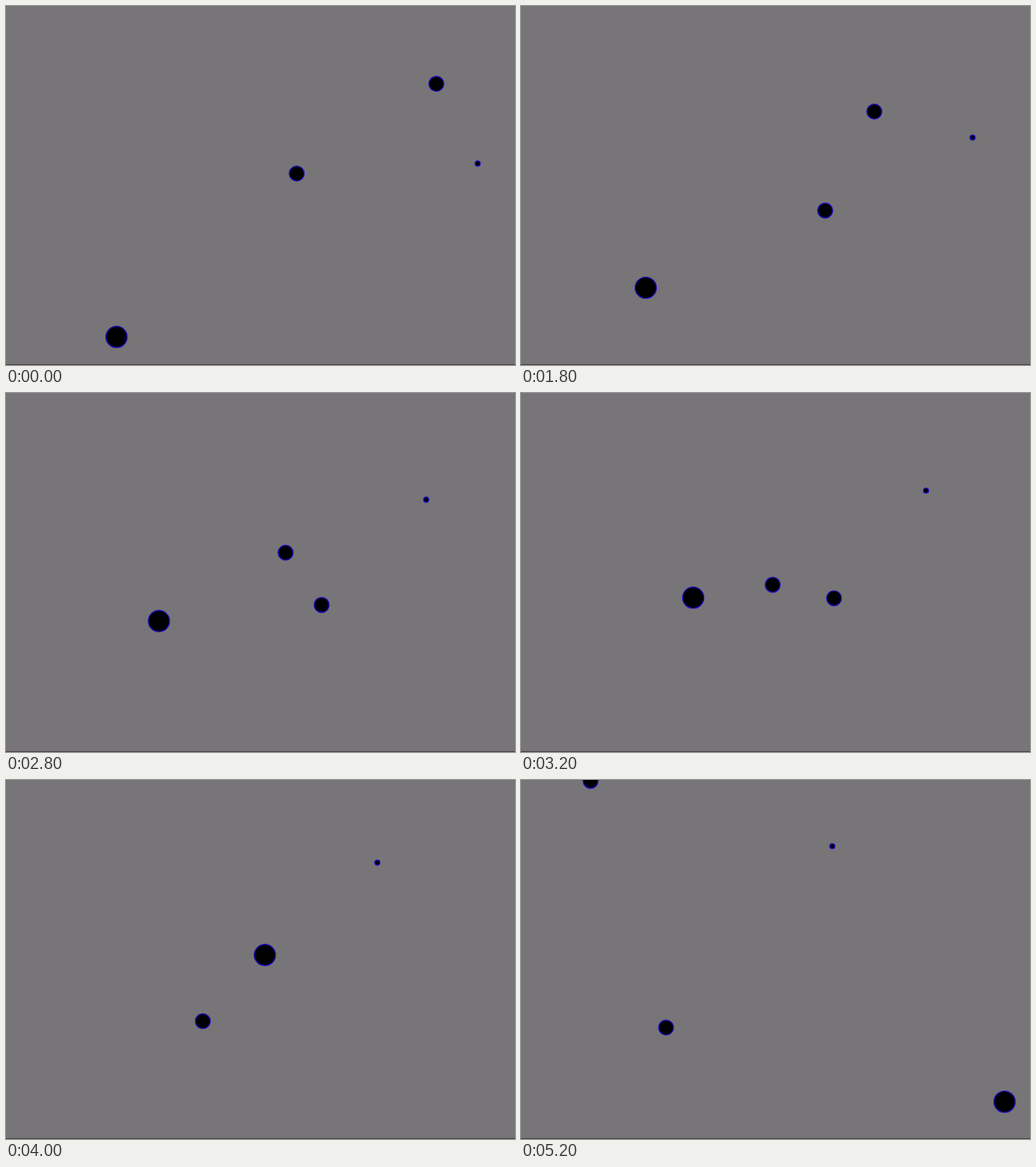
An HTML page for the animation above (5300 ms loop, 600 by 423 pixels).

```html
<!DOCTYPE html>
<html lang="en">
<head>
<meta charset="utf-8">
<title>Four bodies</title>
<style>
html, body { margin: 0; width: 100%; height: 100%; overflow: hidden; background: #777577; }
svg { display: block; width: 100%; height: 100%; }
circle { fill: #000; stroke: #1c08c4; stroke-width: 1.2; }
</style>
</head>
<body>
<svg id="stage" viewBox="0 0 600 423">
  <rect width="600" height="423" fill="#777577"/>
  <rect y="422" width="600" height="1" fill="#4a4347"/>
</svg>
<script>
const LOOP = 5300, STEP = 100, HOLD = 600;
const MEET = 34; // step at which the heavy body and its partner swing past each other

// Smooth curve through a few [step, x, y] points.
function curve(p) {
  const last = p.length - 1;
  const slope = (i, k) => (p[i + 1][k] - p[i][k]) / (p[i + 1][0] - p[i][0]);
  function velocity(i, k) {
    if (i === 0) return 2 * slope(0, k) - velocity(1, k);
    if (i === last) return 2 * slope(last - 1, k) - velocity(last - 1, k);
    const before = p[i][0] - p[i - 1][0], after = p[i + 1][0] - p[i][0];
    return (slope(i - 1, k) * after + slope(i, k) * before) / (before + after);
  }
  return s => {
    let i = 0;
    while (i < last - 1 && s >= p[i + 1][0]) i++;
    const h = p[i + 1][0] - p[i][0], u = (s - p[i][0]) / h, v = 1 - u;
    return [1, 2].map(k =>
      v * v * (1 + 2 * u) * p[i][k] + u * u * (3 - 2 * u) * p[i + 1][k]
      + h * u * v * (v * velocity(i, k) - u * velocity(i + 1, k)));
  };
}

const small = curve([[0, 556, 185.7], [12, 532.3, 155], [26, 477.4, 115], [46, 367, 78]]);
const free = curve([
  [0, 507.3, 91.7], [12, 416.5, 124.4], [18, 363.3, 156.2], [26, 296.7, 226],
  [30, 264, 267], [34, 232, 284.2], [36, 218.7, 288.2], [46, 171, 291.7]]);

// The pair: a drifting midpoint and the gap between the two bodies.
const middle = curve([
  [0, 236.5, 293.7], [12, 252.8, 286.5], [18, 266.5, 274.3], [26, 286, 241.5],
  [34, 305.2, 206.2], [42, 319.3, 196.2], [46, 326, 190.1]]);

// Free fall: distance is smooth in (time left) ^ 2/3.
const fallTime = s => (MEET - s) ** (2 / 3);
const fall = curve([
  [34, 0, 0], [32, 75, 19], [26, 166, 0.6], [18, 205, -43.8], [12, 211.5, -91],
  [0, 212.4, -192.5]].map(([s, x, y]) => [fallTime(s), x, y]));

function gap(s) {
  if (s <= MEET) return fall(fallTime(s));
  const r = 66 * (s - MEET) ** 0.9;
  return [-0.79 * r, -0.612 * r];
}

function pair(side) {
  return s => {
    const m = middle(s), d = gap(s);
    return [m[0] + side * d[0] / 2, m[1] + side * d[1] / 2];
  };
}

const stage = document.getElementById('stage');
function body(r, at) {
  const node = document.createElementNS(stage.namespaceURI, 'circle');
  node.setAttribute('r', r);
  stage.append(node);
  return { node, at };
}
const bodies = [body(3, small), body(8.8, free), body(8.8, pair(1)), body(12.5, pair(-1))];

function draw(time) {
  const s = Math.max(0, Math.floor((time % LOOP - HOLD) / STEP));
  for (const { node, at } of bodies) {
    const [x, y] = at(s);
    node.setAttribute('cx', x.toFixed(2));
    node.setAttribute('cy', y.toFixed(2));
  }
}

function tick(now) {
  draw(now);
  requestAnimationFrame(tick);
}
draw(0);
requestAnimationFrame(tick);
</script>
</body>
</html>
```
